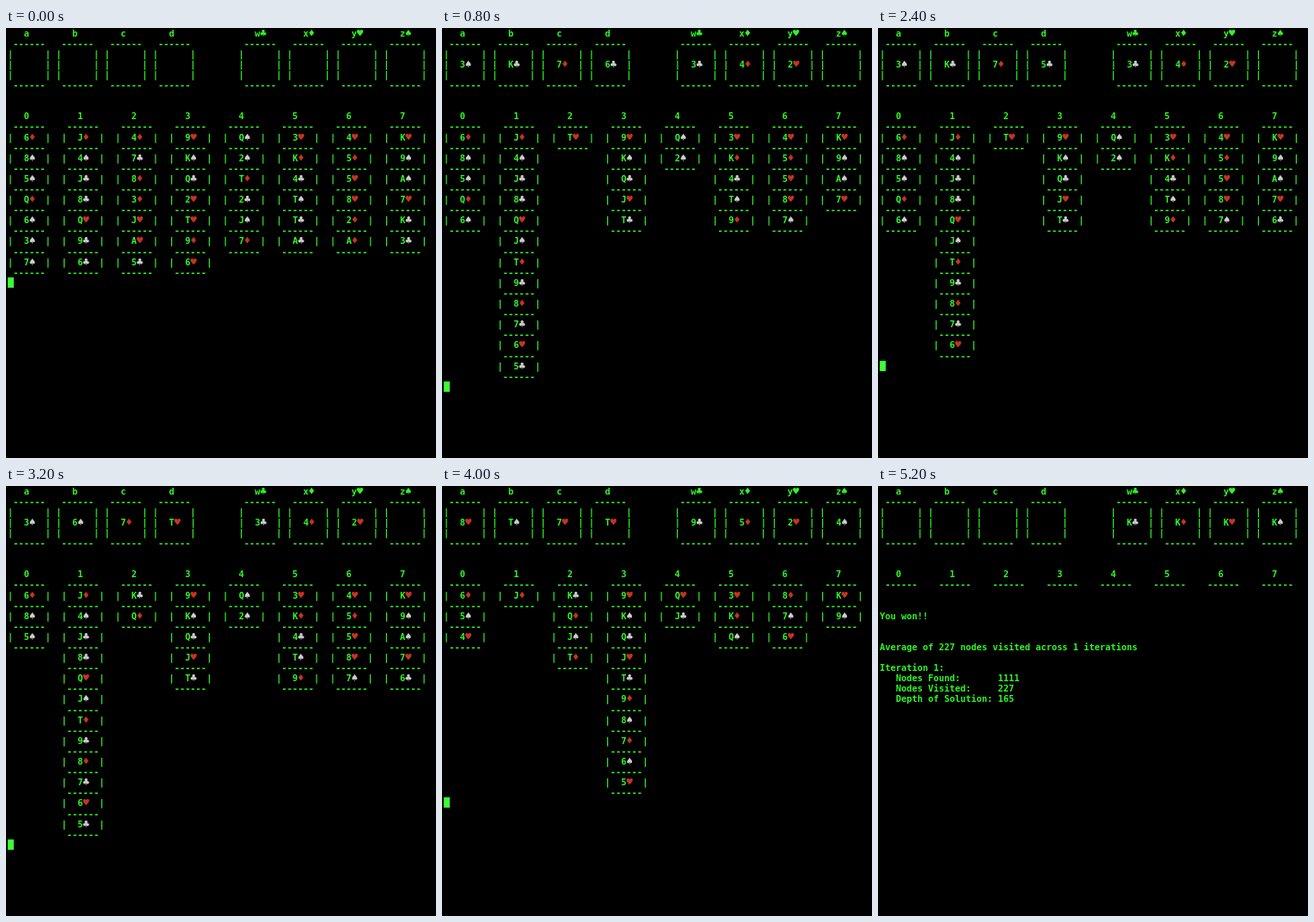
Write an HTML page that moves like this. It is 500x500 px and loops after 5.6 s.

```html
<!DOCTYPE html>
<html lang="en">
<head>
<meta charset="utf-8">
<title>Terminal solitaire solver</title>
<style>
  html, body { margin: 0; width: 100%; height: 100%; overflow: hidden; background: #000; }
  #screen {
    position: absolute; left: 2px; top: -.4px; margin: 0;
    font: bold 10.38px/12.1px "DejaVu Sans Mono", "Liberation Mono", monospace;
    color: #2cfb24; white-space: pre; font-variant-ligatures: none;
  }
  /* Larger suit marks that still advance by one 6.25px cell */
  .suit { font-size: 12px; font-weight: normal; line-height: 0; letter-spacing: -.97px; -webkit-text-stroke: .2px; }
  .red { color: #c73422; }
  .white { color: #cfcfcf; }
  #cursor { position: absolute; left: 2px; width: 7px; height: 12px; background: #3cff36; }
</style>
</head>
<body>
<pre id="screen"></pre>
<div id="cursor"></div>
<script>
const STEP = 400, LINE = 12.1;
const SUITS = { C: '♣', D: '♦', H: '♥', S: '♠' };

// Each layout: free cells / top rank per foundation (C D H S) / eight columns
const LAYOUTS = [
  '-- -- -- --/----/6D8S5SQD6S3S7S JD4SJC8CQH9C6C 4D7C8D3DJHAH5C 9HKSQC2HTH9D6H QS2STD2CJS7D 3HKD4CTSTCAC 4H5D5H8H2DAD KH9SAS7HKC3C',
  '5C 6C 7D --/22A-/6D8S5SQD6S3S JD4SJC8CQHJS 4D7C8D3DJH 9HKSQC2HTH9C QS2STD 3HKD4CTSTC9D 4H5D5H8H7S6H KH9SAS7HKC3C',
  '3S KC 7D 6C/342-/6D8S5SQD6S JD4SJC8CQHJSTD9C8D7C6H5C TH 9HKSQCJHTC QS2S 3HKD4CTS9D 4H5D5H8H7S KH9SAS7H',
  '3S KC 7D 5C/342-/6D8S5SQD6S JD4SJC8CQHJSTD9C8D7C6H TH 9HKSQCJHTC QS2S 3HKD4CTS9D 4H5D5H8H7S KH9SAS7H6C',
  '3S KC 7D 6S/342-/6D8S5SQD JD4SJC8CQHJSTD9C8D7C TH 9HKSQCJHTC QS2S 3HKD4CTS9D 4H5D5H8H7S6H5C KH9SAS7H6C',
  '3S KC 7D 6S/342-/6D8S5SQD JD4SJC8CQHJSTD9C8D7C TH 9HKSQCJHTC9D QS2S 3HKD4CTS 4H5D5H8H7S6H5C KH9SAS7H6C',
  '3S KC 7D 5C/342-/6D8S5SQD6S JD4SJC8CQHJSTD9C8D7C6H TH 9HKSQCJHTC QS2S 3HKD4CTS9D 4H5D5H8H7S KH9SAS7H6C',
  '3S KC 7D TH/342-/6D8S5SQD6S JD4SJC8CQHJSTD9C8D7C6H5C - 9HKSQCJHTC QS2S 3HKD4CTS9D 4H5D5H8H7S KH9SAS7H6C',
  '3S 6S 7D TH/342-/6D8S5S JD4SJC8CQHJSTD9C8D7C6H5C KCQD 9HKSQCJHTC QS2S 3HKD4CTS9D 4H5D5H8H7S KH9SAS7H6C',
  '3S TS -- TH/742-/6D5S JD4SJC8CQHJSTD9C8D KCQD 9HKSQCJHTC9D8S7D6S QS2S 3HKD 4H5D5H8H7S6H KH9SAS7H',
  '8H TS 7H TH/9524/6D5S4H JD KCQDJSTD 9HKSQCJHTC9D8S7D6S5H QHJC 3HKDQS 8D7S6H KH9S',
  '8H TS 7H KD/9556/6D JD KCQDJSTD 9HKSQCJHTC9D8S7D QHJCTH9S - 8D7S6H KHQS',
  '-- -- -- KD/TT8J/- JD KCQD 9HKSQCJH QHJCTH - - KHQS',
  '-- -- -- --/KKKK/- - - - - - - -'
];

const SUMMARY = [
  '', '', 'You won!!', '', '', 'Average of 227 nodes visited across 1 iterations', '',
  'Iteration 1:', '   Nodes Found:       1111', '   Nodes Visited:     227', '   Depth of Solution: 165'
];

const gap = n => ' '.repeat(n);
const dashes = ' ------ ';
const mark = (suit, tone) => `<span class="suit ${tone}">${SUITS[suit]}</span>`;

function face(card) {
  if (!card || card[0] === '-') return gap(2);
  return card[0] + mark(card[1], 'DH'.includes(card[1]) ? 'red' : 'white');
}

const box = card => `|  ${face(card)}  |`;

// Four free cells on the left, four foundations on the right
const topRow = (cells, piles) => cells.join(' ') + gap(8) + piles.join(' ');

function render(layout, won) {
  const [free, tops, table] = layout.split('/');
  const cells = free.split(' ');
  const piles = [...'CDHS'].map((suit, i) => tops[i] + suit);
  const columns = table.split(' ').map(text => text.match(/[^-]{2}/g) || []);
  const depth = Math.max(...columns.map(c => c.length));
  const four = text => Array(4).fill(text);
  const edge = topRow(four(dashes), four(dashes));
  const side = topRow(four(box()), four(box()));
  const lines = [
    topRow([...'abcd'].map(c => gap(3) + c + gap(4)),
           [...'wxyz'].map((c, i) => gap(3) + c + mark('CDHS'[i], 'label') + gap(3))),
    edge, side, topRow(cells.map(box), piles.map(box)), side, edge, '', '',
    columns.map((_, i) => gap(3) + i + gap(4)).join('  '),
    columns.map(() => dashes).join('  ')
  ];
  for (let row = 0; row < depth; row++) {
    const pick = draw => columns.map(c => c[row] ? draw(c[row]) : gap(8)).join('  ');
    lines.push(pick(box), pick(() => dashes));
  }
  if (won) lines.push(...SUMMARY);
  return { html: lines.join('\n'), cursor: won ? null : lines.length * LINE - .6 };
}

const views = LAYOUTS.map((layout, i) => render(layout, i === LAYOUTS.length - 1));
const screenEl = document.getElementById('screen');
const cursorEl = document.getElementById('cursor');
const start = performance.now();
let shown = -1;

function tick() {
  const index = Math.floor((performance.now() - start) / STEP) % views.length;
  if (index !== shown) {
    const view = views[shown = index];
    screenEl.innerHTML = view.html;
    cursorEl.style.display = view.cursor === null ? 'none' : 'block';
    cursorEl.style.top = view.cursor + 'px';
  }
  requestAnimationFrame(tick);
}
tick();
</script>
</body>
</html>
```
